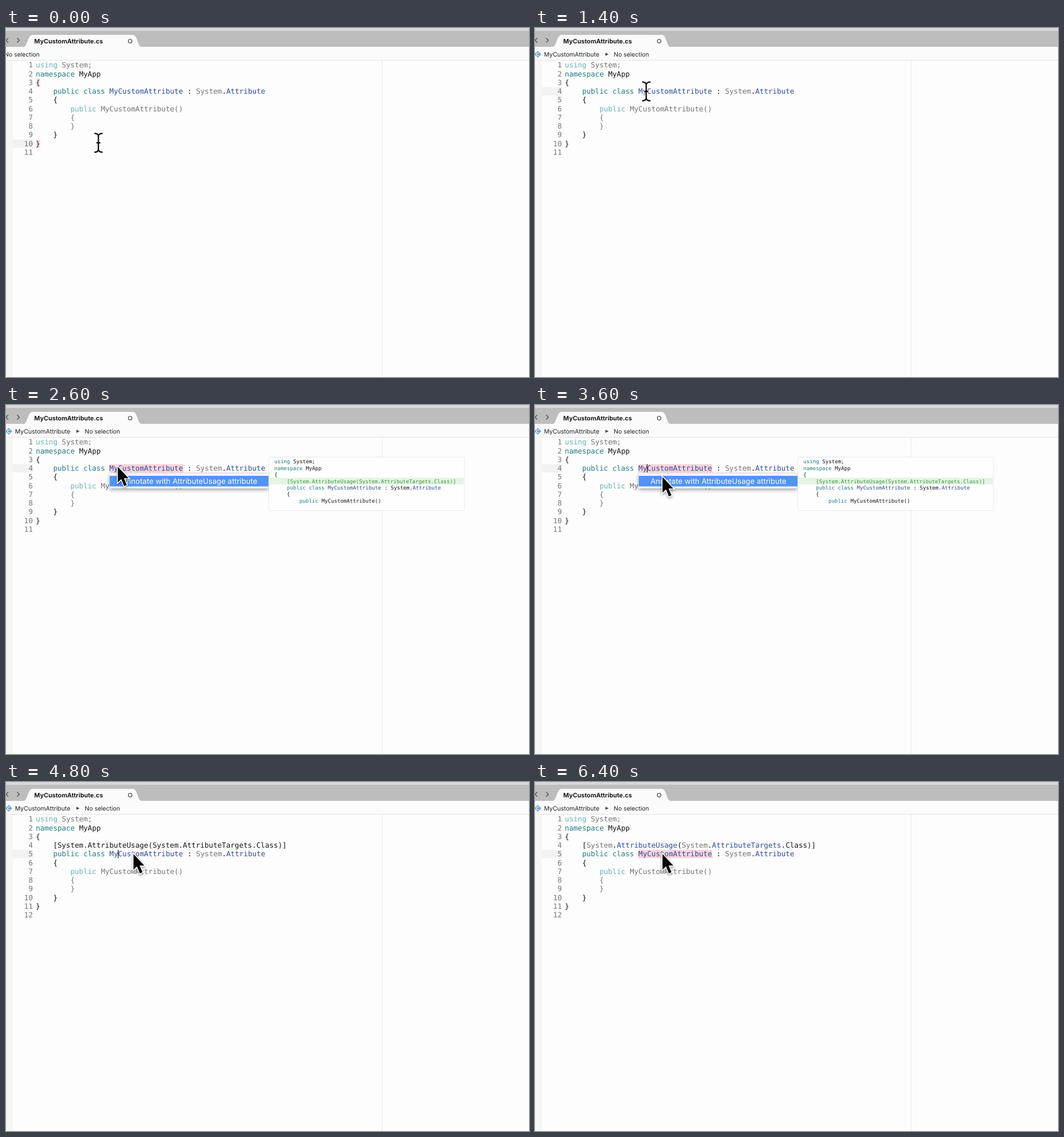
Animation, 917 px wide and 611 px high, one loop 6.6 s. Source, as an HTML page with a canvas:

```html
<!DOCTYPE html>
<html lang="en">
<head>
<meta charset="utf-8">
<title>Code action</title>
<style>
html, body { margin: 0; width: 100%; height: 100%; overflow: hidden; background: #fdfdfd; }
canvas { display: block; }
</style>
</head>
<body>
<canvas id="stage" width="917" height="611"></canvas>
<script>
const ctx = document.getElementById('stage').getContext('2d');
ctx.textRendering = 'geometricPrecision';

const LOOP = 6600, STEP = 200;
const CODE = { x: 52.3, y: 69.3, size: 12.6, advance: 7.59, pitch: 15.26 };
const PREVIEW = { x: 470.6, y: 102.2, size: 9.15, advance: 5.51, pitch: 11.45 };

// Each "~" starts a run; the letter after it picks the colour.
const COLORS = { k: '#207b83', f: '#68b3b4', t: '#2c4d96', g: '#747474', b: '#151515', a: '#3b9440' };
const CLASS_LINE = '~k    public class ~tMyCustomAttribute~b : ~gSystem~b.~tAttribute';
const HEAD = ['~fusing ~gSystem;', '~knamespace ~bMyApp', '~b{'];
const TAIL = [CLASS_LINE, '~b    {', '~f        public ~gMyCustomAttribute()',
  '~g        {', '~g        }', '~b    }', '~b}', ''];
const USAGE_PLAIN = '~b    [System.AttributeUsage(System.AttributeTargets.Class)]';
const USAGE_COLORED = '~b    [~gSystem~b.~tAttributeUsage~b(~gSystem~b.~tAttributeTargets~b.Class)]';
const PREVIEW_LINES = ['~kusing ~bSystem;', '~knamespace ~bMyApp', '~b{',
  USAGE_PLAIN.replace('~b', '~a'), CLASS_LINE.replace('~g', '~b'), '~b    {',
  '~k        public ~bMyCustomAttribute()'];

function rect(x, y, w, h, fill) {
  ctx.fillStyle = fill;
  ctx.fillRect(x, y, w, h);
}

function path(d, fill, stroke, width = 1) {
  const p = new Path2D(d);
  if (stroke) {
    ctx.strokeStyle = stroke;
    ctx.lineWidth = width;
    ctx.stroke(p);
  }
  if (fill) {
    ctx.fillStyle = fill;
    ctx.fill(p);
  }
}

function label(text, x, y, size, color, weight = 400) {
  ctx.font = `${weight} ${size}px Inter, sans-serif`;
  ctx.fillStyle = color;
  ctx.fillText(text, x, y);
}

function codeLine(line, row, style) {
  ctx.font = `${style.size}px "DejaVu Sans Mono", monospace`;
  let col = 0;
  for (const [, color, text] of line.matchAll(/~(\w)([^~]*)/g)) {
    ctx.fillStyle = COLORS[color];
    ctx.fillText(text, style.x + col * style.advance, style.y + row * style.pitch);
    col += text.length;
  }
}

function shadowed(blur, offset, alpha, draw) {
  ctx.save();
  ctx.shadowColor = `rgba(0,0,0,${alpha})`;
  ctx.shadowBlur = blur;
  ctx.shadowOffsetY = offset;
  draw();
  ctx.restore();
}

function drawFrame(inClass) {
  rect(0, 0, 917, 611, '#fdfdfd');
  rect(0, 57, 12, 554, '#f6f6f6');
  rect(659, 57, 1, 554, '#e9e9e9');
  rect(0, 0, 917, 5, '#d7d7da');
  rect(0, 5, 917, 28, '#bdbdbd');
  rect(0, 33, 917, 24, '#fbfbfb');
  rect(0, 56, 917, 1, '#e2e2e2');
  path('M32 33C38 31 38 12 47 12H222C231 12 230 31 237 33Z', '#fafafa');
  path('M4 17.5L0 21.5L4 25.5M19.5 17.5L23.5 21.5L19.5 25.5', null, '#4a4a4a', 1.2);
  path('M214.5 23a3.2 3.2 0 1 0 6.4 0a3.2 3.2 0 1 0 -6.4 0', null, '#333', 1.1);
  label('MyCustomAttribute.cs', 49.5, 27, 10.8, '#1c1c1c', 700);

  if (!inClass) return label('No selection', -3, 50, 10.5, '#222');
  path('M5 40L11 46L5 52L-1 46Z', '#6fa3d8');
  path('M7 44.4A2.5 2.5 0 1 0 7 47.6', null, '#fff', 1.2);
  label('MyCustomAttribute', 15.7, 50, 10.6, '#222');
  path('M123.5 43.3L129 46L123.5 48.7Z', '#444');
  label('No selection', 138, 50, 10.5, '#222');
}

function drawCode(lines, current, { named, braces, caret }) {
  const top = row => 103.6 + (row - 3) * CODE.pitch;
  rect(12, top(current), 36, 14.5, '#f3f2f2');
  if (braces) for (const row of [2, 9]) rect(52.5, top(row), 7.6, 14.5, '#fae6e6');
  if (named) rect(181, top(current), 130, 14.5, '#f8d3dd');
  lines.forEach((line, row) => {
    ctx.textAlign = 'right';
    ctx.font = `${CODE.size}px "DejaVu Sans Mono", monospace`;
    ctx.fillStyle = '#757575';
    ctx.fillText(row + 1, 47, CODE.y + row * CODE.pitch);
    ctx.textAlign = 'left';
    codeLine(line, row, CODE);
  });
  if (caret) rect(196, top(current), 1.2, 14.5, '#111');
}

function drawMenu() {
  shadowed(7, 2, 0.4, () => rect(182, 120, 278, 26, '#f5f5f5'));
  rect(182, 124, 278, 18.5, '#5094f7');
  label('Annotate with AttributeUsage attribute', 202.5, 137.5, 13.15, '#fff');
}

function drawPreview() {
  shadowed(2, 0, 0.22, () => {
    ctx.fillStyle = '#fefefe';
    ctx.beginPath();
    ctx.roundRect(461, 91.5, 342, 93, 3);
    ctx.fill();
  });
  rect(461.5, 127.5, 341, 11.5, '#e3f5e2');
  PREVIEW_LINES.forEach((line, row) => codeLine(line, row, PREVIEW));
}

function drawPointer(x, y, isArrow) {
  ctx.save();
  ctx.translate(x, y);
  if (isArrow) {
    const arrow = 'M0 0V27.5L6.2 21.8L11.2 34L15.8 32L10.7 20.2H19Z';
    shadowed(4, 2, 0.4, () => path(arrow, null, '#fff', 3));
    path(arrow, '#050505');
  } else {
    const beam = 'M-7 -16.5Q0 -16.5 0 -11V11Q0 16.5 -7 16.5M7.5 -16.5Q0 -16.5 0 -11M0 11Q0 16.5 7.5 16.5M-3.5 0H3.5';
    path(beam, null, 'rgba(255,255,255,.75)', 4.5);
    path(beam, null, '#111', 2.4);
  }
  ctx.restore();
}

function glide(t, start, end, from, to) {
  const p = Math.min(1, Math.max(0, (t - start) / (end - start)));
  const eased = p * p * (3 - 2 * p);
  return from.map((v, i) => v + (to[i] - v) * eased);
}

function draw(t) {
  const clicked = t >= 1200, applied = t >= 4800;
  const menuOpen = t >= 2000 && !applied;
  const isArrow = t >= 2000;
  const usage = t >= 5400 ? USAGE_COLORED : USAGE_PLAIN;
  const lines = [...HEAD, ...(applied ? [usage] : []), ...TAIL];

  drawFrame(clicked);
  drawCode(lines, applied ? 4 : clicked ? 3 : 9, {
    named: (t >= 1800 && !applied) || t >= 5800,
    braces: !clicked,
    caret: t >= 2800 && t % 1000 >= 500
  });
  if (menuOpen) {
    drawMenu();
    if (t >= 2200) drawPreview();
  }
  const [x, y] = isArrow
    ? glide(t, 2600, 3400, [196, 108], [223.5, 126])
    : glide(t, 200, 1200, [162, 201], [195, 111]);
  drawPointer(x, y, isArrow);
}

function tick() {
  const t = performance.now() % LOOP;
  draw(Math.floor(t / STEP) * STEP);
  requestAnimationFrame(tick);
}
tick();
</script>
</body>
</html>
```
